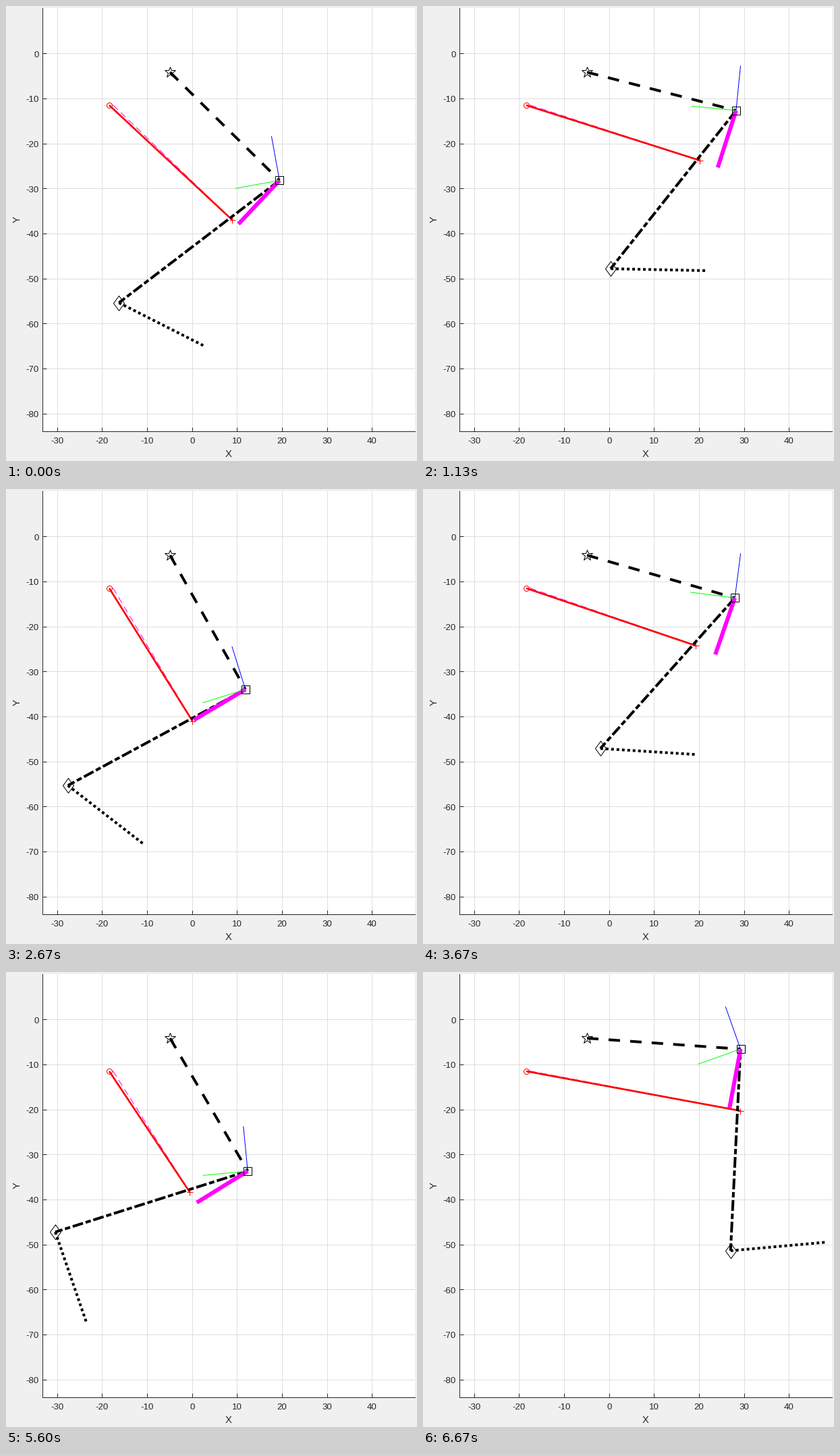
Recreate the animation shown at these times as a matplotlib script. Size 609 px wide and 674 px high, loop 7070 ms.

```python
import numpy as np
import matplotlib.pyplot as plt
from matplotlib.animation import FuncAnimation

W, H, DPI = 609, 674, 100
PX = 72 / DPI                      # one pixel in points
SCALE = 6.668                      # pixels per data unit
X0, Y0 = 275.7, 70.2               # pixel position of the data origin
LEFT, RIGHT, TOP, BOTTOM = 54, 605.5, 3, 630
INK = "#262626"

FRAMES, INTERVAL = 202, 35
POSES, CYCLE = 28, 10.15           # poses per loop, poses per stride

# Linkage, in data units
HIP = np.array([-4.90, -4.18])
ROD_BASE = np.array([-18.40, -11.52])
SPRING_BASE = np.array([-17.58, -11.47])
THIGH, SHANK, FOOT = 34.2, 44.85, 21.15
CRANK, HORN, TRIAD = 13.3, 13.7, 10


def swing(mean, cos, sin):
    """Periodic joint angle as a short Fourier series of the stride phase."""
    k = np.arange(1, len(cos) + 1)
    return lambda p: mean + np.dot(cos, np.cos(k * p)) + np.dot(sin, np.sin(k * p))


# Angles below the horizontal, in degrees
thigh_angle = swing(31.2, (15.6, -2.56, -0.08, 0.50), (27.63, 4.40, -0.41, 0.24))
shank_angle = swing(131.1, (7.70, 3.0, 0.30, 0.60), (32.79, -4.85, -0.45, 0.98))
foot_angle = swing(23.4, (12.15, -11.13, 1.22, 1.23), (31.95, -1.15, -4.77, -0.35))


def pose_start(k):
    """Animation frame at which pose k appears: about four ticks of 1/15 s each."""
    tick = max(2 * k, 4 * k - 3 - max(0, (2 * k - 11) // 7))
    return tick * 1000 // 15 // INTERVAL


starts = [pose_start(k) for k in range(POSES)]

plt.rcParams["font.family"] = "Liberation Sans"
fig = plt.figure(figsize=(W / DPI, H / DPI), dpi=DPI, facecolor="#f0f0f0")
ax = fig.add_axes([LEFT / W, 1 - BOTTOM / H,
                   (RIGHT - LEFT) / W, (BOTTOM - TOP) / H])
ax.set_xlim((LEFT - X0) / SCALE, (RIGHT - X0) / SCALE)
ax.set_ylim((Y0 - BOTTOM) / SCALE, (Y0 - TOP) / SCALE)
x_ticks, y_ticks = range(-30, 41, 10), range(-80, 1, 10)
ax.set_xticks(x_ticks)
ax.set_yticks(y_ticks)
ax.tick_params(direction="in", length=6 * PX, width=PX, color=INK,
               labelbottom=False, labelleft=False)
ax.grid(color="#dedede", lw=PX)
ax.set_axisbelow(True)
for side in ("top", "right"):
    ax.spines[side].set_visible(False)
for side in ("left", "bottom"):
    ax.spines[side].set(color=INK, linewidth=PX)


def label(x, y, text, size=13.3, **kw):
    fig.text(x / W, 1 - y / H, text, size=size * PX, color=INK, **kw)


for v in x_ticks:
    label(X0 + v * SCALE, 648, str(v), ha="center")
for v in y_ticks:
    label(48.5, Y0 - v * SCALE + 5.5, str(v), ha="right")
label(330, 668, "X", 14.7, ha="center")
label(17, 316, "Y", 14.7, ha="center", va="center", rotation=90)


def line(color, width, style="-"):
    return ax.plot([], [], color=color, lw=width * PX, ls=style,
                   solid_capstyle="butt", dash_capstyle="butt", zorder=3)[0]


def marker(shape, size, color="k"):
    return ax.plot([], [], ls="", marker=shape, ms=size * PX, mec=color,
                   mfc="none", mew=PX, zorder=3)[0]


spring = line("magenta", 1, (0, (10, 6)))
rod = line("red", 2.7)
rod_pin, rod_end = marker("o", 8, "red"), marker("+", 9, "red")
thigh = line("black", 4, (0, (4.25, 3.75)))
shank = line("black", 4, (0, (4, 1, 2, 1)))
foot = line("black", 4, (0, (1, 1)))
crank = line("magenta", 6)
green, blue = line("lime", 1), line("blue", 1)
hip_mark, knee_mark = marker("*", 16.5), marker("s", 12)
ankle_mark = marker([(0, 11), (8, 0), (0, -11), (-8, 0), (0, 11)], 22)


def polar(length, angle):
    a = np.radians(angle)
    return length * np.array([np.cos(a), -np.sin(a)])


def join(artist, *points):
    artist.set_data(*np.transpose(points))


def place(artist, point):
    artist.set_data([point[0]], [point[1]])


def update(i):
    pose = np.searchsorted(starts, i, side="right") - 1
    phase = 2 * np.pi * pose / CYCLE
    a, b, c = thigh_angle(phase), shank_angle(phase), foot_angle(phase)

    knee = HIP + polar(THIGH, a)
    ankle = knee + polar(SHANK, b)
    horn = knee + polar(HORN, b - 2.4)
    crank_angle = a + 88.4 + 0.00355 * (52 - a) ** 2
    triad_angle = b - a + 71.7

    join(thigh, HIP, knee)
    join(shank, knee, ankle)
    join(foot, ankle, ankle + polar(FOOT, c))
    join(rod, ROD_BASE, horn)
    join(spring, SPRING_BASE, horn)
    join(crank, knee, knee + polar(CRANK, crank_angle))
    join(green, knee, knee + polar(TRIAD, triad_angle))
    join(blue, knee, knee + polar(TRIAD, triad_angle + 90))
    place(hip_mark, HIP)
    place(knee_mark, knee)
    place(ankle_mark, ankle)
    place(rod_pin, ROD_BASE)
    place(rod_end, horn)
    return ax.lines


anim = FuncAnimation(fig, update, frames=FRAMES, interval=INTERVAL,
                     repeat=True, repeat_delay=0)
plt.show()
```
